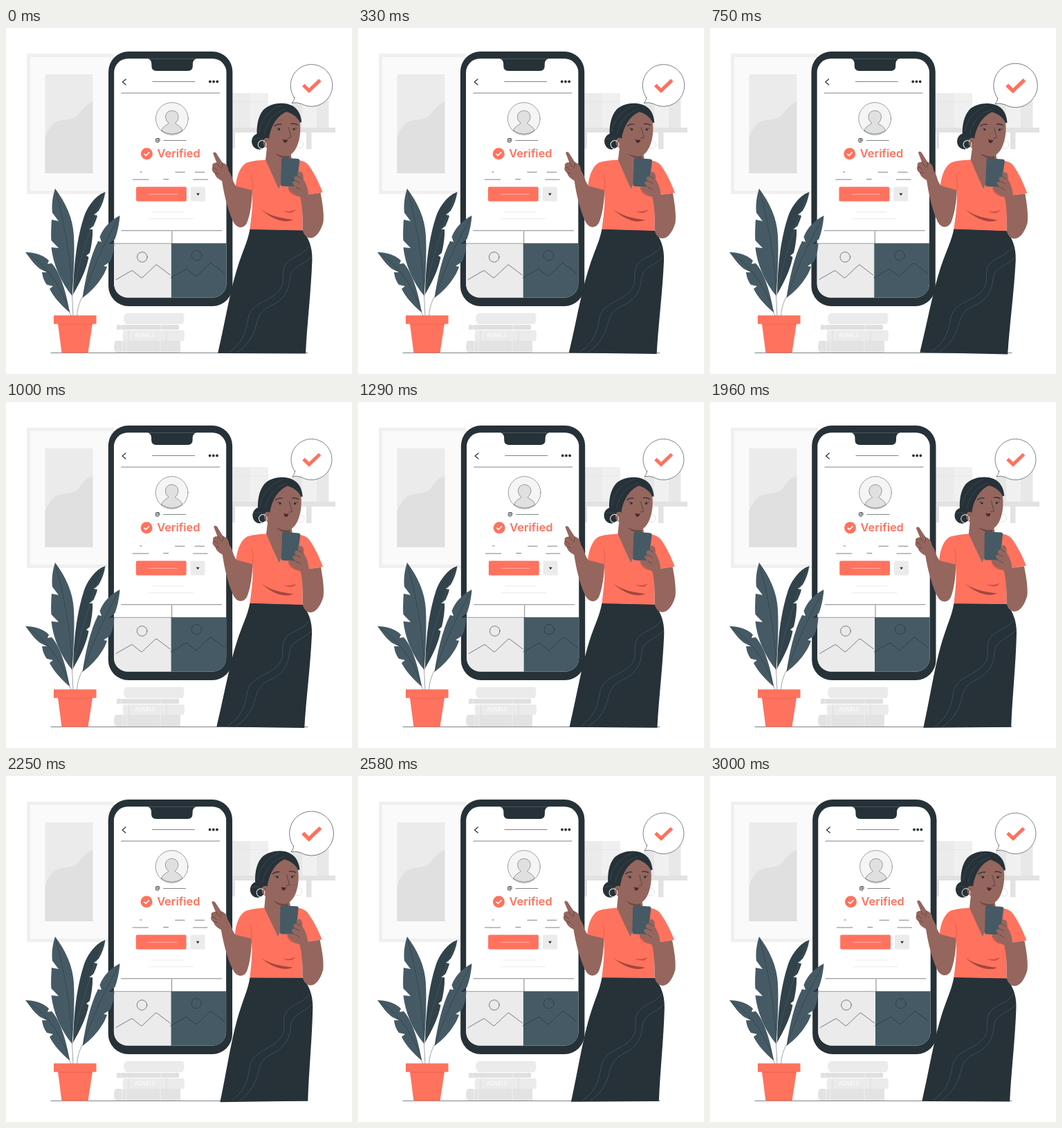
An HTML page that plays this animation: 500x500 px, repeating every 3.04 s.

```html
<!DOCTYPE html>
<html lang="en">
<head>
<meta charset="utf-8">
<title>Verified profile</title>
<style>
  html, body { margin: 0; width: 100%; height: 100%; overflow: hidden; background: #fff; }
  svg { display: block; width: 100vw; height: 100vh; }
  .dark { fill: #263238; }
  .slate { fill: #455a64; }
  .coral { fill: #ff725e; }
  .skin { fill: #94665e; }
  .line { fill: none; stroke: #263238; stroke-width: .6; stroke-linecap: round; stroke-linejoin: round; }
  .fine { stroke-width: .45; }
  .soft { stroke: #dcdcdc; }
  .pale { stroke: #ffd9d2; }
  .wave { fill: none; stroke: #455a64; stroke-width: .7; }
  .crease { fill: none; stroke: #5d3833; stroke-width: .7; stroke-linecap: round; }
</style>
</head>
<body>
<svg viewBox="0 0 500 500">
  <defs>
    <clipPath id="screen"><rect x="156.3" y="44.300" width="162.400" height="345.200" rx="20"/></clipPath>
    <g id="photo">
      <circle class="line" cx="197" cy="331" r="7.300"/>
      <path class="line" d="M159.500 363.500L181 351Q182.500 350.200 184 351.500L195 360.500Q196.500 361.500 198 360L216 343Q217.500 341.700 219 343L237.500 357"/>
    </g>
  </defs>

  <g id="wall">
    <rect x="30" y="37" width="126" height="203" fill="#f0f0f0"/>
    <rect x="35" y="42" width="118" height="193" fill="#fafafa"/>
    <rect x="56.5" y="67" width="69" height="143" fill="#ebebeb"/>
    <path d="M56.5 157C62 145 68 136 77 134C88 131 99 133 105 125C110 117 117 109 125.500 107V210H56.500Z" fill="#e0e0e0"/>
    <rect x="326" y="94" width="27" height="50" fill="#ebebeb"/>
    <rect x="353" y="94" width="26" height="50" fill="#f0f0f0"/>
    <path d="M326 106.500H379" stroke="#e6e6e6" fill="none"/>
    <rect x="413" y="107" width="15" height="37" fill="#e6e6e6"/>
    <rect x="428" y="86" width="21" height="58" fill="#f0f0f0"/>
    <rect x="449" y="86" width="17.500" height="58" fill="#e8e8e8"/>
    <path d="M326 144H476V151H441.500V175H434V151H331V174H327V151H326Z" fill="#e2e2e2"/>
  </g>

  <g id="books">
    <path d="M174 412H255Q258 414 257.500 420T255 428H174Q170 425 170 420T174 412Z" fill="#ebebeb"/>
    <path d="M160 429H250V436H160Z" fill="#e0e0e0"/>
    <path d="M166 429V436M224 429V436" stroke="#ececec"/>
    <path d="M170 437H257Q259 444 257 452H170Q167 444 170 437Z" fill="#ebebeb"/>
    <path d="M177 437V452M232 437V452" stroke="#e2e2e2" stroke-width="1.500"/>
    <text x="186.500" y="447" font-family="Lato, sans-serif" font-size="8" font-style="italic" fill="#fff">NOVELS</text>
    <path d="M159 452H252V469H159Q156 466 156 460T159 452Z" fill="#e3e3e3"/>
    <path d="M168 452V469M174 452V469M223 452V469" stroke="#ebebeb" stroke-width="1.500"/>
  </g>

  <path class="line" d="M65 469.500H436"/>

  <g id="phone">
    <rect class="dark" x="148.200" y="34" width="179.300" height="368" rx="29"/>
    <g clip-path="url(#screen)">
      <rect x="156" y="44" width="163" height="346" fill="#fff"/>
      <path class="dark" d="M203 43.500Q210.500 45 210.500 52V55Q210.500 62 217.500 62H263Q270 62 270 55V52Q270 45 278 43.500Z"/>
      <rect x="156" y="311.300" width="83" height="80" fill="#ebebeb"/>
      <rect class="slate" x="239" y="311.300" width="80" height="80"/>
    </g>
    <path class="line" style="stroke-width:1.200" d="M173.300 74L168.500 78L173.300 82"/>
    <path class="line" d="M212 77.500H273M167 94H309M228 162.500H260M167 292.800H312M240 294V311"/>
    <path class="line fine" d="M157 311.300H319"/>
    <g class="dark"><circle cx="295" cy="77.500" r="1.900"/><circle cx="300.200" cy="77.500" r="1.900"/><circle cx="305.400" cy="77.500" r="1.900"/></g>

    <circle class="line fine" style="fill:#f5f5f5" cx="240" cy="131" r="23.400"/>
    <path class="line fine" style="fill:#e0e0e0" d="M225 148.500C226 142.500 231 141.500 235.500 137.500C228 132 229.500 119.500 240 119.500C250.500 119.500 252 132 244.500 137.500C249 141.500 254 142.500 255 148.500Q240 158 225 148.500Z"/>
    <text class="dark" x="215.600" y="163.500" font-family="Inter, sans-serif" font-size="7.500" font-weight="600">@</text>

    <circle class="coral" cx="203.500" cy="181.700" r="8.500"/>
    <path d="M199.800 181.800L202.500 184.300L207.400 179.300" fill="none" stroke="#fff" stroke-width="1.700"/>
    <text class="coral" x="218.600" y="187.400" font-family="Inter, sans-serif" font-size="16.400" font-weight="600">Verified</text>

    <path class="line" d="M194 208H196.500M245 208.300H258.500M273.500 208.300H287M183.500 219H206M228 218.500H235M271 219H291.500"/>
    <rect class="coral" x="188.200" y="229.600" width="72.800" height="21" rx="2"/>
    <path class="line pale" d="M206.500 240.300H247"/>
    <rect x="267" y="229.600" width="21" height="21" rx="2" fill="#ebebeb"/>
    <path class="dark" d="M275.200 238.700H280L277.600 242.200Z"/>
    <path class="line soft" d="M212.500 266H257M207 275.700H271"/>

    <use href="#photo"/>
    <use href="#photo" x="78.700" y="-2.300"/>
  </g>

  <g id="plant">
    <path class="line fine" d="M91 410L95 417M95.500 386L97 417M110 389Q103 402 102.500 417"/>
    <path d="M143.500 237C131 241 118 256 112 275C105 297 98 331 97 385C107 367 116 350 119.500 331L116 329L121 325C124 313 125.500 300 125 291L120 291L126.500 286C129 280 131 276 132 271L127 270L134 264C139 255 142 247 143.500 237Z" fill="#32424a"/>
    <path class="slate" d="M71 232C66.500 246 66 258 67 267L76 279L66 277C65 290 65 302 65.500 307L76 318L65.500 317C68 341 79 367 95.500 387C97.500 361 99.500 329 98 300C97 275 86 252 71 232Z"/>
    <path class="slate" d="M164.500 271C151 278 140 289 135.500 302L138 309L133 308C122 330 115.500 358 110.500 390C126 379 141 361 146 345L141 344L150 338C154 331 156 321 156.500 311L148 312L157.500 305C161 295 163.500 285 164.500 271Z"/>
    <path class="slate" d="M28 324C41 324 54 328 62 336L60 341L66 340C78 353 87 381 92 411C80 401 69 389 63 377L68 373L59 371C55 366 53 360 52 353L59 353L49 348C41 342 35 333 28 324Z"/>
    <path class="line fine" d="M72 236C84 280 94 335 96 386M163 274C145 305 124 350 111 389M31 326C56 341 80 372 92 410"/>
    <path class="line fine" style="stroke:#55676f" d="M142 240C124 280 106 335 97 384"/>
    <path class="coral" d="M75 427H125L118.500 469.500H80.500Z"/>
    <rect class="coral" x="69" y="415.300" width="61.500" height="12.400"/>
    <path d="M75.500 428H124.500" stroke="#e85f4c" stroke-width=".8"/>
  </g>

  <g id="woman">
    <circle cx="424" cy="168" r="5.600" fill="none" stroke="#d9d9d9" stroke-width=".8"/>
    <path class="dark" d="M352.500 290.500L428.500 292C437 303 443 316 442.500 335C441 380 435 430 433.200 470.500L306.300 470C318 420 325 370 340 330C345 316 350 305 352.500 290.500Z"/>
    <path class="wave" d="M438.500 315C428 332 404 330 401 350C399 364 405 372 388 386C368 399 354 401 350 420C347 444 338 458 323 468"/>
    <path class="wave" d="M441 331C430 343 413 344 410.500 360C409 378 404 389 388 399C367 408 365 416 361 432C356 449 347 460 334 469"/>

    <g id="pointing">
      <path class="skin" d="M299.200 181.500C300 178.500 303.500 179.500 304.800 182.500L312.500 194.500C318 196 321 200 321.500 206C325 211 327 217 328.500 222L334 232L331 227L356 233C355.500 252 353 270 348 282C343 291 333 290 328 279C320 262 315 240 312 221C306 218 302 214 301.500 210C298 208 296.500 204 298.500 201C297 197 299.500 194.500 304.500 195Z"/>
      <path class="crease" d="M304.500 195L309 201M298.500 201.500Q303 202 305.500 206M301.500 209.500L307 210.500M312.500 194.500Q314 199 311 203"/>
    </g>

    <path class="coral" d="M352.500 291C354 275 357.500 258 355.500 234.500L331.800 228.500C333.500 212 339 199 348 194.500C357 191.500 367 191 376 190.500L394 233L413 190.500C424 190.500 432 192 437 198C445 209 452 223 457.500 237.500L437 240.500C433 249 428.500 258 428.500 266L428.500 292.500Z"/>
    <path d="M355.500 234.500C357 226 356 218 354 212" fill="none" stroke="#d95745" stroke-width=".7"/>
    <path d="M407 231C409 240 417 244 427 243L428 259C430 250 433 245 437 241L426 229Z" fill="#d95b49"/>
    <path d="M369 262.500C382 272 398 275 415 277C402 283 384 276 369 262.500Z" fill="#a3473c"/>
    <path d="M400 263.500C407 266 413 265 419 262C415 268.500 407 268 400 263.500Z" fill="#c9503f"/>

    <path class="skin" d="M377 172L375 190.500L394 233L413 191L411 178Z"/>
    <path d="M386 178C393 184 402 186 409 184.500L410 189C402 190 392 186 386 178Z" fill="#744943"/>
    <path class="slate" d="M400.500 187.500L422 189Q424.500 189.500 424.200 192L420 227Q419.500 229.800 417 229.500L399 228.500Q396.800 228.200 397 225.700L398 190Q398.200 187.500 400.500 187.500Z"/>
    <path class="skin" d="M440 303.500C433 303 429 297 428.500 289C429 270 428 255 425 244C417 241 410 236 407.500 230.500C409 227.500 415 229 419 230C415 227 413 224 414 222L419 221C416 219 416 216 418 214.500L422 214C420 210 422 207.500 425 207.500C429 208 430 213 429.500 218C434 225 436.500 233 437 240.500L454.500 238C457 252 460 268 458.500 281C454 296 447 303.500 440 303.500Z"/>
    <path class="crease" d="M419 230Q423 231 425 234M419 221L425 224M422 214L427 217"/>

    <g id="head">
      <ellipse class="dark" cx="365.500" cy="164" rx="10.500" ry="11.500"/>
      <path class="dark" d="M363 160C361 143 364 127 372 118C382 108 402 106 413 112C421 116 426 124 427 136L405 142L380 172Q367 174 363 160Z"/>
      <path class="skin" d="M405 121C412 123 420 127 424.500 136C426 147 425 158 421.500 168C418 178 412 185 404 185C393 184 382 179 376.500 173C371 171 370 162 374 159.500C377 158 379 159 380 160C382 143 391 127 405 121Z"/>
      <path class="wave" style="stroke-width:.5" d="M405 117C390 121 377 133 373 154M398 112C381 117 368 133 366 150M357 161Q365 158 373 162"/>
      <circle cx="370" cy="168.500" r="5.900" fill="none" stroke="#f5f5f5" stroke-width="1"/>
      <path class="crease" d="M377.500 163Q374 162 374 167"/>
      <path d="M388 141.500Q392 138 397.500 139M412 138.500Q417 137.300 421 140" fill="none" stroke="#263238" stroke-width="1.300" stroke-linecap="round"/>
      <g class="dark"><circle cx="394.500" cy="146.300" r="1.700"/><circle cx="416" cy="146.300" r="1.700"/></g>
      <path class="line" d="M391 145L393 144.500M418 144.500L420 145M408 143.500L412 158L407.500 159"/>
      <path d="M400 160C402.500 162.500 405 161 407 161.500C406.500 165 403 167.500 401 164.500Z" fill="#4a2a28"/>
    </g>
  </g>

  <g id="bubble">
    <path class="line" style="fill:#fff" d="M417.500 100.200A29.500 29.500 0 1 1 427 108.700Q420 106 414 107.800Q417.500 104.500 417.500 100.200Z"/>
    <path d="M430 82.500L438 90.300L453.500 75.500" fill="none" stroke="#ff725e" stroke-width="5"/>
  </g>
</svg>
<script>
  const LOOP = 3040, FRAME = 1000 / 24;
  const SHAKE = [[0, 0], [.1, -1], [.2, 2], [.3, -4], [.4, 4], [.5, -4], [.6, 4], [.7, -4], [.8, 2], [.9, -1], [1, 0]];
  const SWAY = [[0, 0], [.25, 1], [.75, -1], [1, 0]];
  const BEAT = [[0, 1], [.1, 1.1], [.3, 1], [.4, 1], [.5, 1.1], [.6, 1], [1, 1]];
  const [phone, woman, bubble] = ['phone', 'woman', 'bubble'].map(id => document.getElementById(id));

  function valueAt(keys, p) {
    const i = Math.max(1, keys.findIndex(k => k[0] >= p));
    const [p0, v0] = keys[i - 1], [p1, v1] = keys[i];
    return v0 + (v1 - v0) * (p - p0) / (p1 - p0);
  }

  function draw(now) {
    // Motion advances in steps of 24 per second.
    const step = Math.floor((now % LOOP + 4) / FRAME);
    const t = Math.min(3000, (step + 1) * 41.4);
    const scale = valueAt(BEAT, t / 1500 % 1);
    phone.setAttribute('transform', `translate(${valueAt(SHAKE, t / 3000)} 0)`);
    woman.setAttribute('transform', `rotate(${valueAt(SWAY, t / 3000)} 378.5 289.5)`);
    bubble.setAttribute('transform', `translate(441.5 83) scale(${scale}) translate(-441.5 -83)`);
  }

  const start = performance.now();
  function tick() {
    draw(performance.now() - start);
    requestAnimationFrame(tick);
  }
  tick();
</script>
</body>
</html>
```
